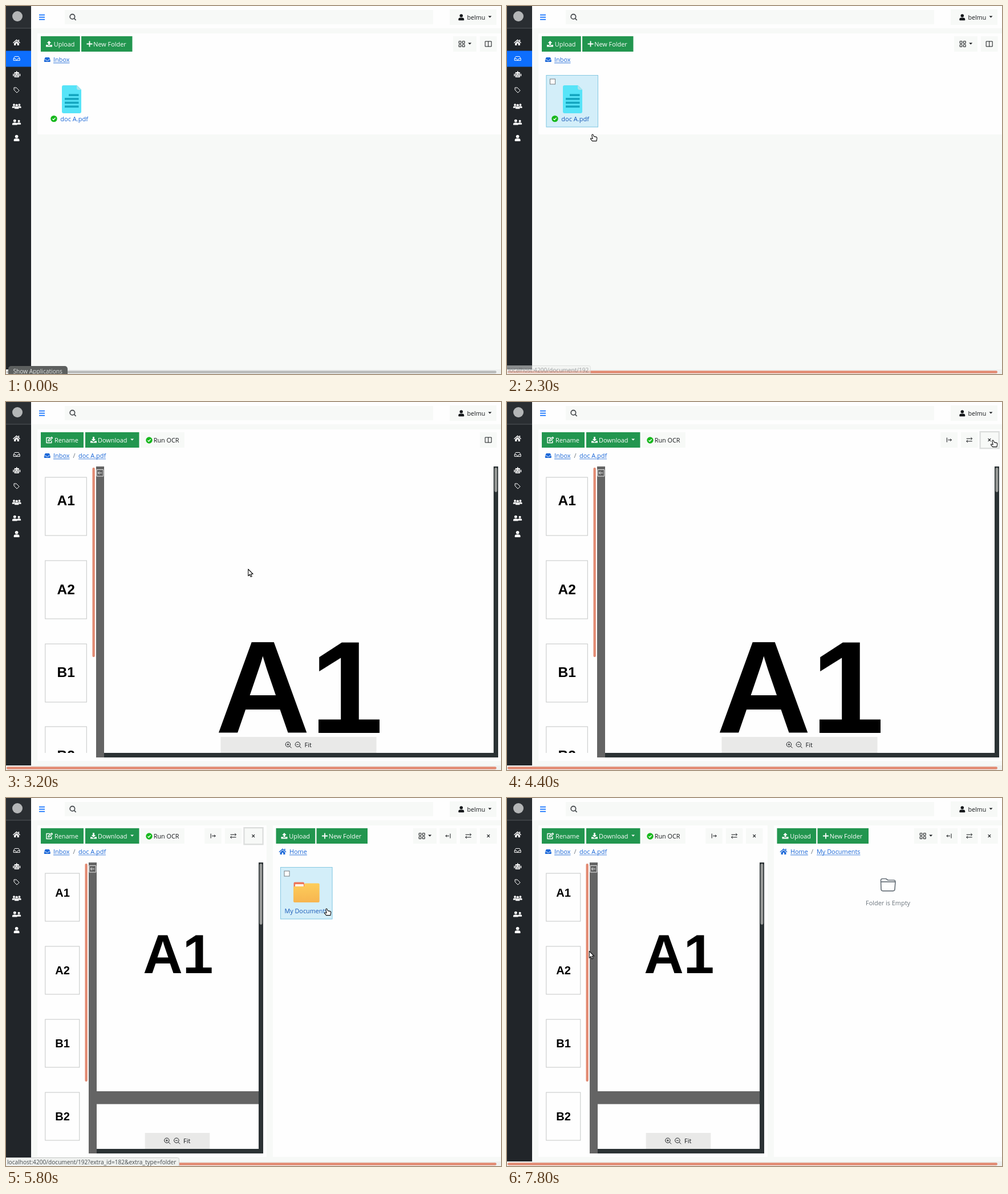
An HTML page with a canvas for the animation above (8000 ms loop, 868 by 645 pixels).

```html
<!DOCTYPE html>
<html lang="en">
<head>
<meta charset="utf-8">
<title>Document browser</title>
<style>
html, body { margin: 0; width: 100%; height: 100%; overflow: hidden; background: #f7f9f7; }
canvas { display: block; width: 868px; height: 645px; }
</style>
</head>
<body>
<canvas id="stage" width="868" height="645"></canvas>
<script>
const g = document.getElementById('stage').getContext('2d');
const LOOP = 8000, STEP = 100;
const SANS = '"Open Sans", "Noto Sans", sans-serif';
const ARIAL = '"Liberation Sans", Arial, sans-serif';
const WHITE = '#fefefe', PALE = '#f7f9f7', INK = '#15181b', BLUE = '#0d6efd';
const LINK = '#1c68d8', LINK_HOVER = '#1759b8', GREEN = '#22964f', OK = '#17b81d';
const ORANGE = '#e28a72', GREY = '#b9bbba', STRIP = '#646464', DARK = '#2b3234';

const ICON = {
  home: 'M0 -5.5L6.5 .2L5.6 1.3L0 -3.6L-5.6 1.3L-6.5 .2ZM-4.4 1.4L0 -2.5L4.4 1.4V5H1.2V1.8H-1.2V5H-4.4ZM3 -5H4.6V-2H3Z',
  inbox: 'M-3.5 -4H3.5L5.2 -.3H2A2 2 0 0 1 -2 -.3H-5.2ZM-5.5 .5H-2.6A2.7 2.7 0 0 0 2.6 .5H5.5V3Q5.5 4 4.5 4H-4.5Q-5.5 4 -5.5 3Z',
  inboxLine: 'M-5.5 .3L-3.3 -3.5H3.3L5.5 .3V3.5H-5.5ZM-5.5 .3H-2A2 2 0 0 0 2 .3H5.5',
  robot: 'M-.7 -6H.7V-4H4V5H-4V-4H-.7ZM-6.5 -1.2H-5V3H-6.5ZM5 -1.2H6.5V3H5ZM-2.7 -1.6H-.9V.3H-2.7ZM.9 -1.6H2.7V.3H.9ZM-2.5 2.2H2.5V3.3H-2.5Z',
  tag: 'M-4.5 -4.5H-.5L4.6 .6L.6 4.6L-4.5 -.5ZM-2.6 -2.2H-2',
  upload: 'M0 -5.5L3.8 -1.5H1.4V2H-1.4V-1.5H-3.8ZM-5.5 1.6H-2.2V3H2.2V1.6H5.5V5H-5.5Z',
  download: 'M0 2.4L3.8 -1.4H1.4V-5.5H-1.4V-1.4H-3.8ZM-5.5 1.8H-2.6L0 4.2L2.6 1.8H5.5V5H-5.5Z',
  plus: 'M-.9 -5H.9V-.9H5V.9H.9V5H-.9V.9H-5V-.9H-.9Z',
  edit: 'M.8 -4H-5V5H3.8V1M-2 2L-1.5 -.4L4 -5L5.5 -3.4L.4 1.6Z',
  grid: 'M-5 -4.8H-1.2V-1H-5ZM1.2 -4.8H5V-1H1.2ZM-5 1.2H-1.2V5H-5ZM1.2 1.2H5V5H1.2Z',
  columns: 'M-5.5 -4.5H5.5V4.5H-5.5ZM0 -4.5V4.5',
  toRight: 'M-3.8 -4V4M-1.8 0H4.2M2 -2.2L4.2 0L2 2.2',
  toLeft: 'M3.8 -4V4M1.8 0H-4.2M-2 -2.2L-4.2 0L-2 2.2',
  swap: 'M-5 2.3H5M-2.8 .2L-5 2.3L-2.8 4.4M-5 -2.3H5M2.8 -4.4L5 -2.3L2.8 -.2',
  close: 'M-2.3 -2.3L2.3 2.3M2.3 -2.3L-2.3 2.3',
  back: 'M-5.8 -5.8H5.8V5.8H-5.8ZM3.5 0H-3.5M-1 -2.6L-3.5 0L-1 2.6',
  caret: 'M-3 -1.5H3L0 1.6Z',
  check: 'M-2.5 .2L-.7 2L2.6 -1.7',
  lens: 'M3.6 -.8A4.2 4.2 0 1 1 -4.8 -.8A4.2 4.2 0 1 1 3.6 -.8M2.4 2.2L5.6 5.4',
  folder: 'M-12.5 -7.5Q-12.5 -10.5 -9.5 -10.5H-3.5L0 -8H10Q13 -8 13 -5L12 8Q11.7 10.8 9 10.8H-9Q-11.7 10.8 -12 8ZM-12.5 -5.2H13',
  arrow: 'M0 0V11.8L2.7 9.2L4.6 13.4L6.5 12.6L4.7 8.5H8.4Z',
  hand: 'M-1 .8Q-.2 -.6 1 .6L2.3 3.6L6.6 4.6Q8 5 7.8 6.6L7 11.6H-.4L-3.2 8.3Q-4 6.8 -2.2 6.9L.2 7.7L-1.2 2Z'
};
for (const k in ICON) ICON[k] = new Path2D(ICON[k]);

function rect(x, y, w, h, fill, r = 0) {
  g.fillStyle = fill;
  g.beginPath();
  g.roundRect(x, y, w, h, r);
  g.fill();
}
function frame(x, y, w, h, col, lw = 1) {
  g.strokeStyle = col;
  g.lineWidth = lw;
  g.strokeRect(x, y, w, h);
}
function disc(x, y, r, fill) {
  g.fillStyle = fill;
  g.beginPath();
  g.arc(x, y, r, 0, 7);
  g.fill();
}
function text(s, x, y, col = INK, size = 11, font = SANS) {
  g.font = size + 'px ' + font;
  g.fillStyle = col;
  g.fillText(s, x, y);
  return g.measureText(s).width;
}
function icon(name, x, y, fill, line, lw = 1, scale = 1) {
  g.save();
  g.translate(x, y);
  g.scale(scale, scale);
  if (fill) { g.fillStyle = fill; g.fill(ICON[name], 'evenodd'); }
  if (line) {
    g.strokeStyle = line;
    g.lineWidth = lw;
    g.lineJoin = 'round';
    g.stroke(ICON[name]);
  }
  g.restore();
}
function person(x, y, s, col) {
  disc(x, y - 2.7 * s, 2.8 * s, col);
  rect(x - 5 * s, y + .8 * s, 10 * s, 4.7 * s, col, [3.2 * s, 3.2 * s, s, s]);
}
function tick(x, y) {
  disc(x, y, 5.7, OK);
  icon('check', x, y, null, '#fff', 1.4);
}
function link(s, x, y) {
  const w = text(s, x, y, LINK, 10.9);
  rect(x, y + 1.4, w, .9, LINK);
}

function shell(active, barCol) {
  rect(0, 0, 868, 645, PALE);
  rect(44, 0, 824, 39, WHITE);
  rect(0, 0, 44, 637, '#212529');
  rect(0, 0, 44, 39, '#2a2e32');
  rect(0, 38.5, 44, 1, '#53575a');
  disc(20, 18, 9, '#b4b6b7');
  if (active) rect(0, 78.5, 44, 28, BLUE);
  icon('home', 18.5, 64, WHITE);
  icon('inboxLine', 18.7, 92, null, WHITE);
  icon('robot', 18.7, 120, WHITE);
  icon('tag', 18.5, 147.5, null, WHITE);
  person(14, 175, .66, WHITE);
  person(23.4, 175, .66, WHITE);
  person(18.7, 176.2, .95, '#212529');
  person(18.7, 176, .78, WHITE);
  person(22.6, 203.7, .72, WHITE);
  person(15.3, 203.7, .88, WHITE);
  person(18.6, 231.5, 1, WHITE);
  for (let i = 0; i < 3; i++) rect(58, 14.8 + 4 * i, 10, 1.7, BLUE);
  rect(103, 7, 646, 25, PALE);
  icon('lens', 117, 19.5, null, '#4c5054', 1.8);
  rect(778, 6, 82, 27, PALE);
  person(798.3, 19.7, 1, INK);
  text('belmu', 808.5, 23.7, INK, 10.7);
  icon('caret', 848.5, 19, INK);
  rect(0, 637, 868, 8, '#eff1f0');
  rect(1, 639.3, 859, 4.4, barCol, 2.2);
}

function greenButton(x, w, name, label, tx) {
  rect(x, 53, w, 27, GREEN);
  if (name === 'edit') icon(name, x + 15, 66.5, null, WHITE, 1.4);
  else icon(name, x + 14.5, 66.5, WHITE);
  text(label, tx, 70.6, WHITE, 10.9);
}
function toolButton(x, name) {
  rect(x, 53, 29.5, 27, PALE);
  icon(name, x + 14.7, 66.5, null, INK, name === 'close' ? 1.1 : 1);
}
function viewMenu(x) {
  rect(x, 53, 41, 27, PALE);
  icon('grid', x + 15.2, 66.5, null, INK);
  icon('caret', x + 29.2, 66, INK);
}
function folderTools(x) {
  greenButton(x, 68.7, 'upload', 'Upload', x + 22.8);
  greenButton(x + 71, 89.5, 'plus', 'New Folder', x + 92.2);
}
function splitTools(x, first, focus) {
  toolButton(x, first);
  toolButton(x + 35.5, 'swap');
  toolButton(x + 70.7, 'close');
  if (focus) frame(x + 69.2, 52.2, 33, 29, '#dcdedd', 2.4);
}
function card(x, hover) {
  if (!hover) return;
  rect(x, 121, 91.5, 91.5, '#d3eef9');
  frame(x + .5, 121.5, 90.5, 90.5, '#86c8e2');
  rect(x + 7, 128, 9, 9, WHITE, 1);
  frame(x + 7, 128, 9, 9, '#777d80');
}

function inboxView(hover) {
  rect(55, 48, 813, 177, WHITE);
  folderTools(61);
  viewMenu(784);
  toolButton(831, 'columns');
  icon('inbox', 72.3, 94, LINK);
  link('Inbox', 83, 98);
  card(68.5, hover);
  rect(98, 139, 34, 49, '#57e4f8', 3);
  g.fillStyle = hover ? '#d3eef9' : WHITE;
  g.beginPath();
  g.moveTo(124, 138.5); g.lineTo(132.5, 138.5); g.lineTo(132.5, 147); g.fill();
  g.fillStyle = '#a9e3ec';
  g.beginPath();
  g.moveTo(124, 139); g.lineTo(132, 147); g.lineTo(126, 147); g.lineTo(124, 145); g.fill();
  for (let i = 0; i < 4; i++) rect(i ? 103 : 110, 154.3 + 6.7 * i, i ? 24.5 : 17.5, 3.7, '#14a6c0');
  tick(84, 197.6);
  text('doc A.pdf', 95.3, 201.6, hover ? LINK_HOVER : LINK, 11);
}

function documentTools() {
  greenButton(61, 75, 'edit', 'Rename', 85);
  greenButton(139, 94.5, 'download', 'Download', 161);
  icon('caret', 221.2, 66, WHITE);
  rect(236, 53, 77, 27, PALE);
  tick(251, 67);
  text('Run OCR', 258.8, 70.6, INK, 10.8);
  icon('inbox', 72.3, 94, LINK);
  link('Inbox', 83, 98);
  text('/', 117.5, 98, '#6c757d', 11);
  link('doc A.pdf', 127, 98);
}

// v: strip edge, viewer right edge, thumb size/pitch/font, scroll lengths, page font and origin
function viewer(v) {
  g.save();
  g.beginPath();
  g.rect(55, 113, 813, 502);
  g.clip();
  ['A1', 'A2', 'B1', 'B2'].forEach((s, i) => {
    const y = 132 + v.pitch * i;
    rect(69, y, v.tw, v.th, WHITE);
    frame(68.8, Math.round(y) + .0, v.tw, v.th, '#c4c6c5');
    g.textAlign = 'center';
    text(s, 69 + v.tw / 2, y + v.base + (i ? v.shift : 0), '#000', 'bold ' + v.font, ARIAL);
    g.textAlign = 'left';
  });
  g.restore();
  rect(v.x - 6.5, 115, 4.3, v.bar, ORANGE, 2);
  rect(v.x, 113, v.r - v.x, 510, STRIP);
  icon('back', v.x + 6.8, 124.3, null, '#e6e6e6', 1);
  const px = v.x + 14, pr = v.r - 8;
  rect(px, 113, pr - px, Math.min(502, v.page), WHITE);
  if (v.page < 502) rect(px, 536.5, pr - px, 78.5, WHITE);
  text('A1', v.ax, v.ay, '#000', 'bold ' + v.big, ARIAL);
  rect(pr, 113, 8, 510, DARK);
  rect(px, 615, v.r - px, 8, DARK);
  rect(pr + 1.6, 115, 4.8, v.thumb, '#979997', 2.4);
  const mid = (px + pr) / 2 - .5, w = (pr - px) * .4;
  rect(mid - w / 2, 587, w, 28, '#e9e9e8');
  [-18, -1].forEach((d, i) => {
    icon('lens', mid + d, 601, null, INK, 1);
    rect(mid + d - 2.6, 599.8, 4, .9, INK);
    if (!i) rect(mid + d - 1.05, 598.2, .9, 4, INK);
  });
  text('Fit', mid + 10.5, 605, INK, 11);
}
const WIDE = { x: 158, r: 863, tw: 72.5, th: 102, pitch: 145.8, base: 49, shift: 9.8, font: 24.5,
  bar: 332, page: 502, big: 230, ax: 367.3, ay: 580, thumb: 43 };
const HALF = { x: 145, r: 451, tw: 60, th: 84, pitch: 127.9, base: 41.2, shift: 8.3, font: 20,
  bar: 382, page: 401, big: 96.3, ax: 240.2, ay: 307.3, thumb: 107 };

function wideView(split) {
  rect(55, 48, 813, 581, WHITE);
  documentTools();
  if (split) splitTools(760.5, 'toRight', true);
  else toolButton(831, 'columns');
  viewer(WIDE);
}

function splitView(t) {
  rect(55, 48, 402, 581, WHITE);
  rect(468, 48, 400, 581, WHITE);
  documentTools();
  splitTools(348.3, 'toRight', t < 6200);
  viewer(HALF);
  folderTools(473.5);
  viewMenu(714);
  splitTools(760.5, 'toLeft', false);
  icon('home', 485, 94, LINK);
  link('Home', 497, 98);
  if (t >= 6400) {
    text('/', 533, 98, '#6c757d', 11);
    link('My Documents', 543, 98);
    icon('folder', 668, 152, null, '#6c757d', 1.7);
    g.textAlign = 'center';
    text('Folder is Empty', 668, 187.5, '#6c757d', 10.9);
    g.textAlign = 'left';
    return;
  }
  card(481, t >= 5400);
  rect(504.5, 147.5, 18.5, 14, '#ee7658', 2);
  rect(507, 151, 15, 6, '#fff3e6', 1);
  const shade = g.createLinearGradient(0, 150, 0, 183);
  shade.addColorStop(0, '#fdcd5a');
  shade.addColorStop(1, '#f7b550');
  g.fillStyle = shade;
  g.beginPath();
  g.roundRect(504, 155, 45.7, 28, 2);
  g.roundRect(523, 149.5, 26.7, 12, 2);
  g.fill();
  text('My Documents', 488.5, 201.6, t >= 5500 ? LINK_HOVER : LINK, 10.8);
}

function status(s, w, alpha) {
  g.globalAlpha = alpha;
  rect(-2, 630.5, w + 2, 16, '#eff1ef', [0, 3, 0, 0]);
  g.strokeStyle = '#c9cbca';
  g.lineWidth = 1;
  g.beginPath();
  g.roundRect(-2, 630.5, w + 2, 18, [0, 3, 0, 0]);
  g.stroke();
  text(s, 2, 642, '#454a4d', 10.15);
  g.globalAlpha = 1;
}

const PATH = [
  [300, 40, 655], [700, 100, 520], [1000, 136, 350], [1200, 126, 303], [1600, 118, 185],
  [1900, 118, 185], [2300, 150, 225], [2600, 193, 306], [2800, 193, 306], [3200, 424.7, 293],
  [3700, 835, 80], [3900, 852, 67], [4500, 852, 67], [4700, 834.5, 85.5], [5400, 579, 209],
  [5600, 562, 194], [6100, 562, 194], [7000, 180, 290], [7400, 145, 118], [7500, 145, 118],
  [7800, 144.3, 268.5]
];
const HANDS = [[1500, 2400], [3800, 4600], [5400, 6400], [7400, 7600]];

function pointer(t) {
  if (t < PATH[0][0]) return;
  let [, x, y] = PATH[PATH.length - 1];
  const i = PATH.findIndex(p => p[0] > t);
  if (i > 0) {
    const a = PATH[i - 1], b = PATH[i], k = (t - a[0]) / (b[0] - a[0]);
    x = a[1] + (b[1] - a[1]) * k;
    y = a[2] + (b[2] - a[2]) * k;
  }
  const hand = HANDS.some(([a, b]) => t >= a && t < b);
  icon(hand ? 'hand' : 'arrow', x, y, '#fff', '#111', 1.1);
}

function draw(t) {
  shell(t < 2400, t < 1800 ? GREY : ORANGE);
  if (t < 2400) inboxView(t >= 1500);
  else if (t < 4600) wideView(t >= 4400);
  else splitView(t);

  if (t < 800) {
    g.globalAlpha = Math.min(1, (800 - t) / 300);
    rect(4, 631, 104, 18, '#5d605f', 5);
    text('Show Applications', 12.5, 643.5, '#e4e6e5', 10.2);
    g.globalAlpha = 1;
  }
  const url = 'localhost:4200/document/192';
  if (t >= 1800 && t < 2400) status(url, 146.5, t < 2200 ? 1 : .5);
  if (t >= 5800 && t < 6400) status(url + '?extra_id=182&extra_type=folder', 303.5, 1);
  pointer(t);
}

const start = performance.now();
function tick60() {
  const t = (performance.now() - start) % LOOP;
  draw(Math.floor(t / STEP) * STEP);
  requestAnimationFrame(tick60);
}
tick60();
</script>
</body>
</html>
```
